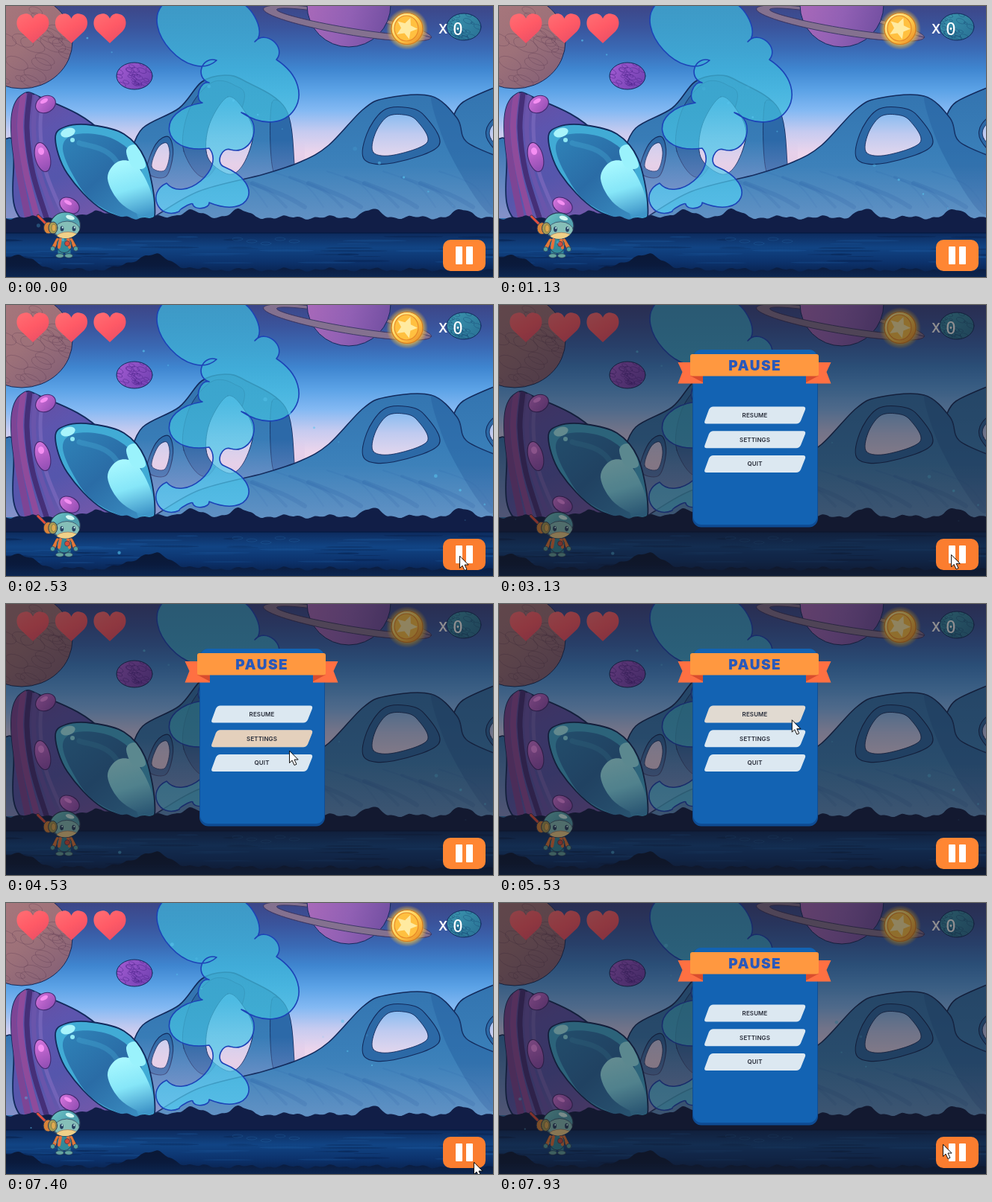
Write an HTML page with a canvas that moves like this. It is 652 by 364 pixels and loops after 8000 ms.

```html
<!DOCTYPE html>
<html lang="en">
<head>
<meta charset="utf-8">
<title>Pause menu</title>
<style>
html, body { margin: 0; width: 100%; height: 100%; overflow: hidden; background: #0a1a3c; }
canvas { display: block; width: 652px; height: 364px; }
</style>
</head>
<body>
<canvas id="stage" width="652" height="364"></canvas>
<script>
const W = 652, H = 364, LOOP = 8000;
const INK = '#122a5c';
const view = document.getElementById('stage').getContext('2d');
const scene = document.createElement('canvas');
scene.width = W;
scene.height = H;
let c = scene.getContext('2d');

const clamp = v => Math.max(0, Math.min(1, v));
const ease = v => v * v * (3 - 2 * v);
const times = (n, fn) => Array.from({ length: n }, (_, i) => fn(i));

function random(seed) {
  return () => (seed = (seed * 16807) % 2147483647) / 2147483647;
}

function gradient(x0, y0, x1, y1, ...colors) {
  const g = c.createLinearGradient(x0, y0, x1, y1);
  colors.forEach((col, i) => g.addColorStop(i / (colors.length - 1), col));
  return g;
}

function paint(path, fill, stroke, width = 1.2) {
  if (fill) { c.fillStyle = fill; c.fill(path); }
  if (stroke) { c.strokeStyle = stroke; c.lineWidth = width; c.stroke(path); }
}

// Smooth curve through a flat list of x, y pairs
function spline(v, closed) {
  const n = v.length / 2, p = new Path2D();
  const at = i => {
    i = closed ? (i + n) % n : Math.max(0, Math.min(n - 1, i));
    return [v[2 * i], v[2 * i + 1]];
  };
  p.moveTo(...at(0));
  for (let i = 0; i < (closed ? n : n - 1); i++) {
    const [a, b, d, e] = [at(i - 1), at(i), at(i + 1), at(i + 2)];
    p.bezierCurveTo(b[0] + (d[0] - a[0]) / 6, b[1] + (d[1] - a[1]) / 6,
      d[0] - (e[0] - b[0]) / 6, d[1] - (e[1] - b[1]) / 6, d[0], d[1]);
  }
  if (closed) p.closePath();
  return p;
}

const blob = (v, fill, stroke, width) => paint(spline(v, true), fill, stroke, width);
const line = (v, stroke, width) => paint(spline(v), null, stroke, width);

function oval(x, y, rx, ry, fill, stroke, width, turn = 0) {
  const p = new Path2D();
  p.ellipse(x, y, rx, ry, turn, 0, 7);
  paint(p, fill, stroke, width);
  return p;
}

function box(x, y, w, h, r, fill) {
  const p = new Path2D();
  p.roundRect(x, y, w, h, r);
  paint(p, fill);
}

function poly(v, fill) {
  const p = new Path2D();
  for (let i = 0; i < v.length; i += 2) p.lineTo(v[i], v[i + 1]);
  p.closePath();
  paint(p, fill);
}

function inside(path, draw) {
  c.save();
  c.clip(path);
  draw();
  c.restore();
}

// Smooth ridge above a straight bottom
function land(ridge, bottom, fill, stroke) {
  const p = spline(ridge), body = new Path2D(p);
  body.lineTo(ridge[ridge.length - 2], bottom);
  body.lineTo(ridge[0], bottom);
  paint(body, fill);
  if (stroke) paint(p, null, stroke, 1.6);
  return body;
}

// Rough silhouette with equal peaks
function rocks(base, height, width, peaks, fill) {
  const y = x => base - height * peaks.reduce((s, p) => s + Math.exp(-(((x - p) / width) ** 2)), 0)
    + 1.3 * Math.sin(x * 0.3) + 1.6 * Math.sin(x * 0.11 + 1);
  land(times(112, i => [i * 6 - 6, y(i * 6 - 6)]).flat(), H + 2, fill);
}

// Opening in the rock, its rim being the same outline enlarged
function opening(v, scale, sky) {
  const n = v.length / 2;
  const mid = [0, 1].map(k => v.reduce((s, w, i) => i % 2 === k ? s + w : s, 0) / n);
  blob(v.map((w, i) => mid[i % 2] + (w - mid[i % 2]) * scale), '#2c69a6', INK, 1.1);
  blob(v, sky, INK, 0.9);
}

function planet(x, y, rx, ry, fill, mark, seed) {
  const rnd = random(seed), p = oval(x, y, rx, ry, fill);
  inside(p, () => times(26, () => {
    const a = rnd() * 6.3, d = Math.sqrt(rnd()), s = (0.06 + rnd() * 0.12) * rx;
    oval(x + Math.cos(a) * d * rx, y + Math.sin(a) * d * ry, s * 1.6, s * 0.8, null, mark, 0.8, 0.4);
  }));
  paint(p, null, INK, 1);
}

function drawSky() {
  c.fillStyle = gradient(0, 0, 0, 225, '#3d4688', '#3a549c', '#3a69b4', '#3f86d0', '#5ba2e6', '#84b9f3', '#c6cbf0', '#ecd5ec', '#f5dbea');
  c.fillRect(0, 0, W, 300);

  planet(21, 48, 68, 63, gradient(-20, 0, 70, 110, '#a8777c', '#9d7179', '#835f76'), 'rgba(80,50,75,.35)', 11);
  planet(172, 94, 24, 18, gradient(150, 80, 195, 110, '#a05ad0', '#7040b0'), 'rgba(75,35,135,.6)', 8);
  planet(613, 28, 23, 18, gradient(595, 12, 630, 45, '#3b94ae', '#2a7396'), 'rgba(23,70,115,.5)', 5);

  const ring = new Path2D();
  ring.ellipse(457, 23, 114, 15, 0.17, 0, 7);
  ring.ellipse(457, 21, 96, 8, 0.17, 0, 7);
  const drawRing = () => {
    c.fillStyle = '#84718f';
    c.fill(ring, 'evenodd');
    paint(ring, null, '#3c3866', 1);
  };
  drawRing();
  oval(459, -1, 56, 56, gradient(410, 0, 510, 30, '#a668b9', '#9160b4', '#7450a2'), INK, 1);
  const front = new Path2D('M330 0L580 43V80H330Z');
  inside(front, drawRing);
}

function drawMountains() {
  const rock = gradient(0, 95, 0, 290, '#3272ae', '#397eb8', '#4a8bc0');
  const hole = gradient(0, 130, 0, 215, '#6cb3f0', '#c0cbf0', '#f3dcec');
  land([0, 178, 12, 188, 30, 285], 290, '#3576b2', INK);
  const arch = land([166, 200, 183, 164, 232, 137, 262, 102, 293, 93, 320, 101, 374, 138, 386, 215, 386, 250], 290, rock, INK);
  inside(arch, () => {
    blob([238, 195, 245, 140, 275, 103, 305, 106, 318, 130, 272, 228], '#2d68a5', INK, 0.8);
    blob([356, 130, 380, 150, 388, 225, 358, 222], '#2c69a8', INK, 0.8);
  });
  blob([297, 122, 320, 142, 331, 172, 318, 212, 298, 226, 270, 203, 272, 160], hole, INK, 1);
  opening([195, 216, 203, 191, 215, 184, 219, 200, 212, 221], 1.45, hole);
  c.fillStyle = gradient(0, 180, 0, 285, 'rgba(190,170,220,0)', 'rgba(178,160,214,.65)');
  c.fillRect(0, 180, 400, 105);

  land([598, 150, 612, 129, 660, 107], 290, rock, INK);
  opening([649, 178, 650, 162, 668, 152, 668, 194], 1.4, hole);

  const big = land([196, 285, 258, 249, 345, 226, 395, 209, 432, 187, 478, 139, 508, 124, 569, 121, 604, 151, 616, 182, 660, 203], 290, rock, INK);
  inside(big, () => {
    times(13, i => {
      const x = 350 + i * 25, y = 222 + i % 3 * 8;
      line([x, 270, x - 25, y + 18, x - 70, y], `rgba(36,96,165,${0.15 + i % 3 * 0.08})`, 2 + i % 3 * 2);
    });
    blob([569, 121, 604, 151, 620, 186, 660, 205, 650, 280, 595, 200], 'rgba(37,93,158,.45)');
    c.fillStyle = gradient(0, 215, 0, 285, 'rgba(150,160,205,0)', 'rgba(150,160,205,.3)');
    c.fillRect(196, 215, 460, 75);
  });
  opening([492, 197, 494, 172, 510, 149, 532, 146, 550, 154, 564, 183, 520, 200], 1.38, hole);
}

function drawShip() {
  const hull = spline([22, 119, 8, 145, 10, 200, 28, 292, 190, 296, 130, 172, 45, 122], true);
  paint(hull, gradient(10, 120, 100, 285, '#6a4c9e', '#5d55ae', '#5556ac', '#6f58aa'), INK, 1.8);
  inside(hull, () => times(5, i => {
    const x = 10 + i * 9;
    line([x + 4, 118, x, 165, x + 8, 225, x + 22 + i * 4, 296], ['#7d4595', '#8f4b9b', '#452f78', '#6a55ab', '#7263b8'][i], 9 - i);
  }));
  for (const [x, y, rx, ry, turn] of [[53, 132, 14, 11, -0.5], [49, 203, 10, 20, -0.25], [85, 268, 14, 10, 0.5]]) {
    oval(x, y, rx, ry, gradient(x - rx, y - ry, x + rx, y + ry, '#d878e0', '#b35fc6', '#8a4bb0'), '#41286f', 1.1, turn);
    oval(x - 2, y - ry * 0.4, rx * 0.4, ry * 0.25, '#f58ef2', null, 0, turn);
  }
  const dome = spline([66, 178, 80, 162, 115, 160, 158, 172, 186, 205, 199, 265, 190, 289, 130, 274, 82, 225], true);
  paint(dome, '#41abd5');
  inside(dome, () => {
    blob([76, 188, 95, 172, 140, 177, 174, 205, 190, 260, 175, 288, 118, 264, 88, 224], gradient(80, 170, 180, 285, '#2f83b8', '#2a6ca6', '#3a8cc0'));
    line([98, 184, 145, 205, 181, 285], 'rgba(80,190,226,.25)', 7);
    blob([136, 232, 150, 209, 175, 214, 196, 255, 194, 284, 155, 266], gradient(150, 210, 172, 285, '#a8f8ff', '#86e6f8', '#3f95c8'));
    blob([161, 194, 174, 187, 187, 215, 170, 217], '#9af2fc');
    oval(83, 170, 10, 6, '#a8f4fb', null, 0, -0.3);
    oval(89, 180, 3, 3, '#91eaf5');
  });
  paint(dome, null, INK, 1.8);
}

// Each corner: x, y and how far the arc from there swells outward
function drawSmoke() {
  const corners = [
    [212, -4, 0.35], [282, 73, 0.5], [272, 103, 0.33], [263, 130, 0.8], [272, 191, -0.36],
    [215, 238, 0.55], [232, 276, -0.1], [250, 266, 0.3], [272, 264, 0.87], [292, 216, -0.4],
    [301, 193, 0.46], [315, 143, 0.67], [362, 72, 0.44], [333, 48, 0.28], [303, -4, 0]
  ];
  const p = new Path2D();
  p.moveTo(212, -4);
  corners.forEach(([x, y, swell], i) => {
    const [u, v] = corners[(i + 1) % corners.length];
    const nx = (y - v) * swell * 4 / 3, ny = (u - x) * swell * 4 / 3;
    p.bezierCurveTo(x + nx, y + ny, u + nx, v + ny, u, v);
  });
  paint(p, gradient(0, 0, 0, 276, 'rgba(62,174,214,.8)', 'rgba(66,190,222,.72)', 'rgba(84,212,248,.66)'), '#1c43b7', 1.6);
}

function drawGround() {
  rocks(284, 10, 17, [122, 246, 311, 490, 612], '#111e47');
  c.fillStyle = gradient(0, 305, 0, H, '#0d2b5e', '#114484', '#0c326c', '#081d45');
  c.fillRect(0, 305, W, 60);
  c.fillStyle = '#071b42';
  c.fillRect(0, 304, W, 1.5);
  const rnd = random(77);
  times(50, i => oval(rnd() * W, 309 + rnd() * 42, 10 + rnd() * 38, 0.5 + rnd(), i % 2 ? 'rgba(37,110,184,.2)' : 'rgba(3,19,54,.25)'));
  times(5, i => oval(310 + i * 19, 313 + i % 3 * 3, 7, 2, null, 'rgba(60,140,200,.25)', 0.7));
  rocks(354, 20, 34, [10, 195], gradient(0, 332, 0, H, '#0a1836', '#0a1a3c', '#0c2650'));
}

function drawHud() {
  for (const x of [36, 87.5, 139]) {
    const p = new Path2D(`M${x} 50L${x - 17} 34C${x - 24} 27 ${x - 23} 13 ${x - 13} 11C${x - 7} 9 ${x - 2} 12 ${x} 17` +
      `C${x + 2} 12 ${x + 7} 9 ${x + 13} 11C${x + 23} 13 ${x + 24} 27 ${x + 17} 34Z`);
    paint(p, gradient(x - 10, 12, x + 10, 46, '#ff6970', '#ff5a66', '#ed5065'));
  }
  const glow = c.createRadialGradient(537, 31, 18, 537, 31, 28);
  glow.addColorStop(0, 'rgba(255,205,60,.95)');
  glow.addColorStop(1, 'rgba(255,190,50,0)');
  c.fillStyle = glow;
  c.fillRect(505, 0, 64, 64);
  oval(537, 30.5, 21, 21, gradient(520, 14, 554, 48, '#fff0a0', '#ffcf50', '#ee9428'), '#d37b22', 1.2);
  oval(536, 30, 16, 17, '#ffc040', '#e88a28', 1.2);
  poly(times(10, i => {
    const a = i * Math.PI / 5 - 1.2, r = i % 2 ? 7 : 15;
    return [536 + Math.cos(a) * r, 30 + Math.sin(a) * r];
  }).flat(), '#ffeaa0');
  label('X', 585, 30.5, '600 17px Inter, sans-serif', '#fff');
  label('0', 605, 30.5, '23px "DejaVu Sans Mono", monospace', '#fff');
}

function label(text, x, y, font, fill, gap = 0) {
  c.font = font;
  c.fillStyle = fill;
  c.textAlign = 'center';
  c.letterSpacing = gap + 'px';
  const m = c.measureText(text);
  c.fillText(text, x + gap / 2, y + (m.actualBoundingBoxAscent - m.actualBoundingBoxDescent) / 2);
  c.letterSpacing = '0px';
}

function drawHero(g) {
  const swing = g * Math.PI / 530, sway = Math.sin(swing), bob = 0.8 - 0.8 * Math.cos(swing);
  const dark = '#293a58', sides = [-1, 1];
  for (const s of sides) {
    box(78 + s * 5 - 3.5, 326, 7, 9, 2, '#32889a');
    oval(78 + s * 6, 335.5, 5.5, 2.8, '#64a5a0', dark, 0.8);
  }
  c.save();
  c.translate(0, bob);
  for (const s of sides) {
    const arm = [78 + s * 9, 314, 78 + s * (15 + sway * 0.7), 325];
    line(arm, dark, 6);
    line(arm, '#e27838', 4.5);
    oval(78 + s * 15.5, 326, 3.2, 3.2, '#54a1a0', dark, 0.8);
  }
  oval(78, 321, 10, 10.5, '#328a9a', dark, 0.9);
  for (const s of sides) line([78 + s * 5, 313, 78 + s * 7, 324], '#e8703a', 4);
  oval(82, 319, 3.5, 3.5, '#d64b38', dark, 0.7);

  c.translate(sway * 0.5, 0);
  line([43, 282, 57, 296], dark, 4.5);
  line([43, 282, 57, 296], '#e54e3e', 3);
  const helmet = oval(79.5, 294.5, 20, 17.5, gradient(64, 279, 98, 311, '#6cc4c4', '#4f9fb0', '#5aa8ae'), dark, 1.2);
  inside(helmet, () => {
    oval(82, 301, 17, 12, '#86bfb8', dark, 0.7);
    oval(83, 310, 15, 6.5, '#f0d088', '#98674e', 0.6);
  });
  for (const x of [75, 91]) {
    oval(x, 299, 2.4, 3.6, '#263f62');
    oval(x + 0.7, 297.5, 0.9, 1.2, '#d4fbf7');
  }
  oval(86, 284, 6, 2.8, '#d4f8f2', null, 0, 0.3);
  oval(57, 298, 6.5, 8, '#d98338', dark, 1);
  oval(63, 298, 6, 8, '#a79d54', dark, 1);
  oval(64, 298, 3, 5, '#dfaa50', '#786d42', 0.7);
  c.restore();
}

// Floating motes: each lives two seconds, then reappears elsewhere
function drawMotes(g) {
  times(14, i => {
    const life = g / 2000 + i / 14, n = Math.floor(life), age = life - n;
    const rnd = random(4001 + i * 7919 + n * 104729);
    rnd();
    const x = rnd() * W + age * 20 - 10, y = 30 + rnd() * 290 + age * 25, r = 1 + rnd() ** 2 * 3.5;
    c.globalAlpha = 0.65 * Math.sin(age * Math.PI);
    oval(x, y, r, r, '#58c5ee');
  });
  c.globalAlpha = 1;
}

// Time and tip position at each turn of the pointer
const pointer = [
  [1690, 654, 218], [1930, 605, 274], [2330, 607, 337], [3100, 607, 337], [3660, 392, 150], [3840, 392, 150],
  [4120, 431, 168], [4530, 379, 197], [4700, 385, 215], [5190, 431, 187], [5370, 431, 187],
  [5600, 381, 147], [6400, 381, 147], [7330, 626, 348], [7870, 626, 348], [7930, 594, 324]
];

function cursorAt(t) {
  if (t < pointer[0][0]) return [-99, -99];
  const i = pointer.findIndex(p => p[0] > t);
  if (i < 0) return pointer[pointer.length - 1].slice(1);
  const [t0, x0, y0] = pointer[i - 1], [t1, x1, y1] = pointer[i];
  const k = ease((t - t0) / (t1 - t0));
  return [x0 + (x1 - x0) * k, y0 + (y1 - y0) * k];
}

function drawCursor([x, y]) {
  c.save();
  c.translate(x, y);
  paint(new Path2D('M.5.5V16.5L4 13L7 19.5L10 18.2L7 12H11.8Z'), '#fff', '#111', 1);
  c.restore();
}

// Share of the last 150 ms spent over a button
function hover(t, y) {
  return times(15, i => cursorAt(t - i * 10))
    .filter(([px, py]) => px > 275 && px < 410 && py >= y && py < y + 24).length / 15;
}

function drawMenu(t, alpha) {
  c.globalAlpha = alpha;
  c.fillStyle = 'rgba(22,20,24,.48)';
  c.fillRect(0, 0, W, H);
  box(259, 60, 168, 238.5, 12, 'rgba(14,78,151,.97)');
  box(260, 60, 166, 235, 11, 'rgba(20,101,180,.97)');
  for (const s of [-1, 1]) {
    const mirror = (...v) => v.map((n, i) => i % 2 ? n : 342 + s * n);
    poly(mirror(86, 77, 102.5, 77, 96.5, 90, 102.5, 105.5, 69, 105.5, 69, 95), '#ff7042');
    poly(mirror(86, 95, 69, 95, 69, 104), '#d84d2e');
  }
  box(256, 66, 172, 29.5, 3, '#ff9840');
  label('PAUSE', 342, 81, '900 19px Inter, sans-serif', '#2959bb', 1.5);
  ['RESUME', 'SETTINGS', 'QUIT'].forEach((name, i) => {
    const y = 136.5 + i * 32.75;
    const p = new Path2D(`M287 ${y}H407Q411 ${y} 410 ${y + 4}L404 ${y + 19}Q402 ${y + 23} 398 ${y + 23}` +
      `H278Q274 ${y + 23} 275.5 ${y + 19}L281 ${y + 4}Q283 ${y} 287 ${y}Z`);
    paint(p, '#dce8f1');
    c.globalAlpha = alpha * hover(t, y);
    paint(p, '#f4a052');
    c.globalAlpha = alpha;
    label(name, 342.5, y + 11.7, '600 8px Inter, sans-serif', '#272c39', 0.1);
  });
  c.globalAlpha = 1;
}

function drawPauseButton([x, y]) {
  const over = x > 585 && x < 642 && y > 314 && y < 356;
  box(585, 314, 57, 42, 10, over ? '#fb7d2f' : '#ff8633');
  for (const left of [602, 616]) box(left, 323, 9, 24, 1, '#fff');
}

// Game time stands still before the start and while paused
function gameTime(t) {
  const run = (a, b) => Math.max(0, Math.min(t, b) - a);
  return run(870, 2600) + run(6270, 7530);
}

function draw(t) {
  const g = gameTime(t), cursor = cursorAt(t);
  c.drawImage(scene, 0, 0);
  drawHero(g);
  drawMotes(g);
  if (t >= 2600 && t < 6270) drawMenu(t, clamp((t - 2540) / 270));
  if (t >= 7530) drawMenu(t, clamp((t - 7470) / 260));
  drawPauseButton(cursor);
  drawCursor(cursor);
}

c.lineJoin = view.lineJoin = 'round';
c.lineCap = view.lineCap = 'round';
drawSky();
drawMountains();
drawShip();
drawSmoke();
drawGround();
drawHud();
c = view;

const start = performance.now();
function tick() {
  draw((performance.now() - start) % LOOP);
  requestAnimationFrame(tick);
}
tick();
</script>
</body>
</html>
```
